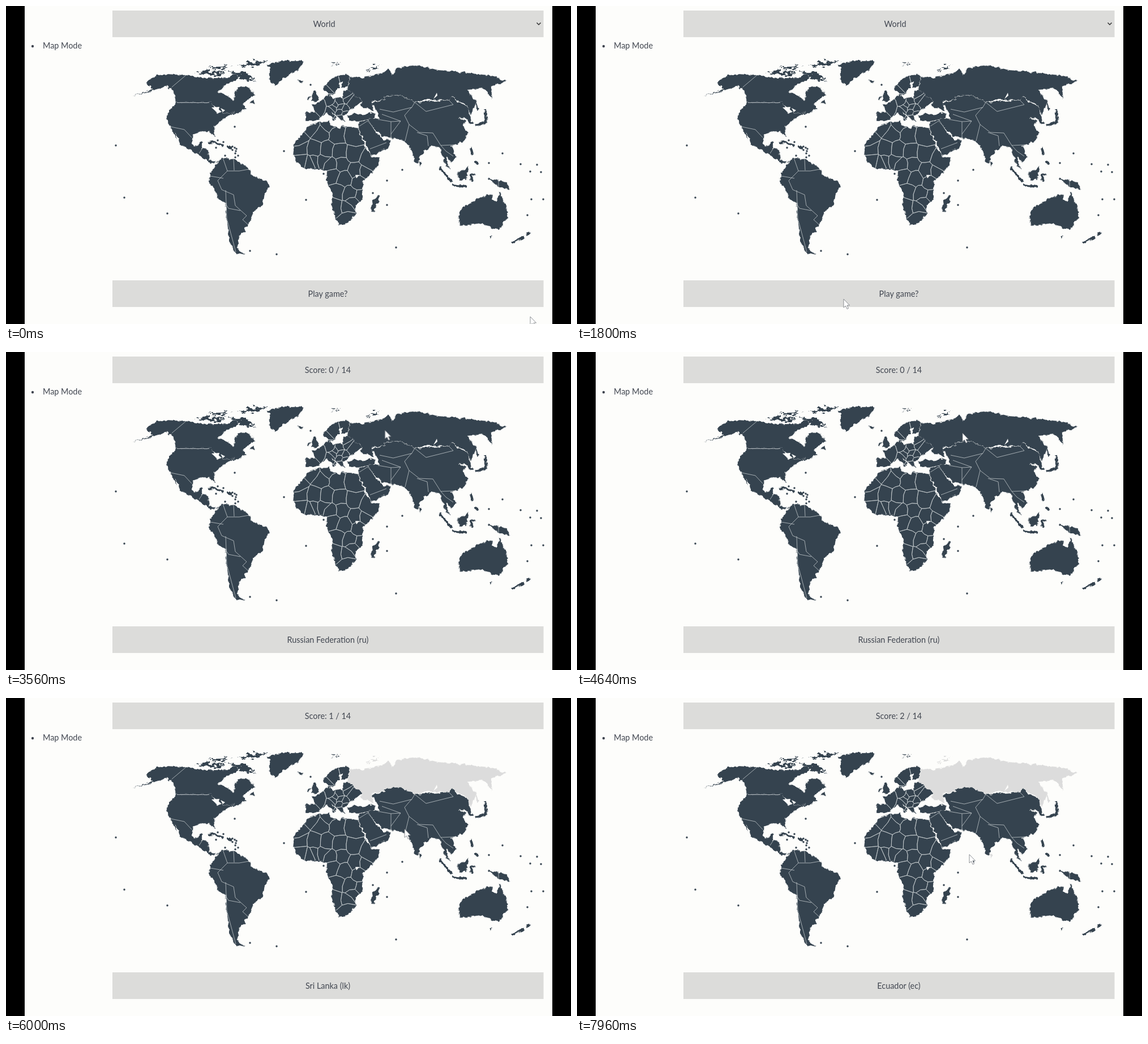
These frames come from a looping animation (998x561 px, 8 s). An HTML page:

```html
<!DOCTYPE html>
<html lang="en">
<head>
<meta charset="utf-8">
<title>Map quiz</title>
<style>
html, body { margin: 0; width: 100%; height: 100%; overflow: hidden; background: #fdfdfb; }
svg { display: block; width: 100vw; height: 100vh; }
text { font: 14.4px Lato, "Open Sans", sans-serif; fill: #414650; text-anchor: middle; }
.bar { fill: #dcdcda; }
.land { fill: #35434f; stroke: #fdfdfb; stroke-width: .3; stroke-linejoin: round; }
.isles { fill: none; stroke: #35434f; stroke-width: 4; }
.borders { fill: none; stroke: #d3d8da; stroke-width: .7; stroke-linejoin: round; }
.water { fill: #fdfdfb; }
.dots { fill: none; marker: url(#dot); }

/* One loop is 8 s, so 1% is 80 ms. */
.step { visibility: hidden; animation: 8s step-end infinite; }
.menu { animation-name: menu; }
.first { animation-name: first; }
.second { animation-name: second; }
.third { animation-name: third; }
@keyframes menu { 0% { visibility: visible } 24%, 100% { visibility: hidden } }
@keyframes first { 24% { visibility: visible } 60%, 100% { visibility: hidden } }
@keyframes second { 60% { visibility: visible } 90%, 100% { visibility: hidden } }
@keyframes third { 90%, 100% { visibility: visible } }

.russia { animation: solved-early 8s linear infinite; }
.lanka { animation: solved-late 8s linear infinite; }
@keyframes solved-early { 0%, 60% { fill: #35434f } 63%, 100% { fill: #dcdcdc } }
@keyframes solved-late { 0%, 90% { fill: #35434f } 93%, 100% { fill: #dcdcdc } }

.cursor { animation: cursor 8s ease-in-out infinite; }
@keyframes cursor {
  0%, .5% { transform: translate(926px, 548px) }
  5.5%, 7.5% { transform: translate(880px, 538px) }
  17.5%, 24% { transform: translate(471px, 517px) }
  32.5%, 35.5% { transform: translate(539px, 449px) }
  45.5%, 46% { transform: translate(672px, 132px) }
  49% { transform: translate(681px, 143px) }
  67.5% { transform: translate(681px, 143px); animation-timing-function: ease-in }
  75% { transform: translate(704px, 231px); animation-timing-function: ease-out }
  87.5% { transform: translate(729px, 278px) }
  97.5% { transform: translate(729px, 278px); animation-timing-function: ease-in }
  99.5%, 100% { transform: translate(693px, 276px) }
}
</style>
</head>
<body>
<svg viewBox="0 0 998 561" preserveAspectRatio="none">
  <defs>
    <filter id="coast" filterUnits="userSpaceOnUse" x="188" y="80" width="762" height="370" color-interpolation-filters="sRGB">
      <feTurbulence type="fractalNoise" baseFrequency=".14" numOctaves="2" seed="4"/>
      <feDisplacementMap in="SourceGraphic" scale="7" xChannelSelector="R" yChannelSelector="G"/>
    </filter>
    <filter id="ragged" filterUnits="userSpaceOnUse" x="188" y="80" width="762" height="370" color-interpolation-filters="sRGB">
      <feTurbulence type="fractalNoise" baseFrequency=".12 .2" numOctaves="3" seed="9"/>
      <feDisplacementMap in="SourceGraphic" scale="18" xChannelSelector="R" yChannelSelector="G"/>
    </filter>
    <marker id="dot" viewBox="-2 -2 4 4" markerWidth="4" markerHeight="4" markerUnits="userSpaceOnUse">
      <circle r="1.75" fill="#35434f"/>
    </marker>
    <clipPath id="old-world">
      <use href="#africa"/><use href="#europe"/><use href="#nordic"/>
    </clipPath>
  </defs>

  <rect width="998" height="561" fill="#fdfdfb"/>
  <path d="M0 0H33V561H0zM965 0H998V561H965z"/>
  <path class="bar" d="M188 8H949.5V55H188zM188 484H949.5V531H188z"/>
  <circle cx="47" cy="71" r="2.2" fill="#414650"/>
  <text x="65" y="75" style="text-anchor:start">Map Mode</text>

  <!-- Arctic islands -->
  <g class="land" filter="url(#ragged)">
    <path d="M404 107 430 99 468 96 440 105zM392 114 430 118 440 131 414 130zM335 119 352 113 388 117 378 124zM358 109 402 105 374 112zM572 101 593 100 580 104z"/>
    <path class="russia" d="M636 118 648 107 662 106 646 112z"/>
  </g>

  <g class="land" filter="url(#coast)">
    <!-- The Americas -->
    <path d="M221 159 260 146 247 136 262 123 286 120 318 122 354 127 392 127 404 118 412 128 392 137 375 150 390 157 402 167 405 153 410 142 430 143 440 157 418 172 425 182 403 191 388 192 362 172 300 172 297 152 285 141 260 149z"/>
    <path d="M300 170H362L374 189 404 187 382 201 367 213 369 232 361 222 345 221 330 226 328 243 337 248 341 241 349 239 346 251 357 253 359 271 371 275 368 279 353 272 334 258 308 245 300 223 302 236 290 212 284 200 286 189z"/>
    <path d="M459 104 486 97 526 97 517 112 489 128 475 142 464 128 468 110zM513 131 525 130 521 136zM430 171 438 165 441 172z"/>
    <path d="M371 279 382 267 404 271 429 287 434 298 461 310 465 318 457 332 453 351 438 362 427 388 420 390 423 397 413 406 408 427 424 440 404 436 394 412 387 347 376 341 358 308 361 295z"/>
    <!-- Europe and Africa -->
    <path id="nordic" d="M563 150 562 141 578 127 600 120 607 124 604 142 592 145 595 133 587 137 588 144 578 157 571 157z"/>
    <path id="europe" d="M529 186 547 187 541 174 554 169 570 155 578 164 594 161 596 151 605 147 630 168 614 181 606 180 603 190 594 194 598 206 583 193 575 187 584 197 579 203 566 188 549 203 529 203z"/>
    <path d="M541 152 546 149 553 166 539 170zM534 160 540 159 532 167zM604 194 616 190 637 191 641 186 652 191 648 198 622 204 606 202z"/>
    <path id="africa" d="M537 208 572 202 573 209 588 216 594 211 621 215 636 251 647 266 662 267 657 283 631 309 630 341 618 351 618 367 603 384 587 386 574 350 577 331 566 309 567 291 556 287 527 287 512 274 507 262 510 242 524 225z"/>
    <path d="M659 333 659 342 649 364 644 357 648 342z"/>
    <!-- Asia -->
    <path d="M624 204 641 201 654 223 668 236 680 237 674 250 646 264 622 217z"/>
    <path d="M643 171 670 165 668 159 696 157 722 170 782 166 787 159 806 173 816 177 819 195 826 209 820 209 814 200 800 197 812 203 807 209 816 224 808 239 786 247 795 266 786 275 777 265 785 290 774 274 765 249 750 246 732 264 728 278 723 276 711 245 699 236 664 230 641 207 640 197 660 199 652 178z"/>
    <path class="lanka" d="M729 273 734 278 730 283z"/>
    <g class="russia">
      <path d="M607 124 627 127 668 118 675 110 684 121 690 109 724 104 764 113 790 115 860 123 884 133 857 141 859 165 845 145 815 148 831 170 821 193 815 176 787 159 782 166 740 165 722 170 696 157 668 159 670 165 646 168 649 187 626 176 630 168 604 148z"/>
      <path d="M830 165 836 182 831 184z"/>
    </g>
    <!-- Oceania -->
    <path d="M797 294 817 283 813 307 801 307zM850 303 884 311 890 324 868 318z"/>
    <path d="M799 370 804 357 838 338 849 333 860 334 858 341 867 345 871 327 887 362 885 374 871 395 853 391 842 383 820 386 801 388zM853 405 861 404 855 411z"/>
    <path class="isles" d="M846 183 849 204 830 211M767 286 788 311M789 316 813 319M821 250 824 262M830 273 834 281M829 296 821 298 823 310M926 398 919 403M916 407 893 418M357 241 368 240 384 247M391 249 399 250"/>
  </g>

  <path class="water" d="M363 179 377 178 374 189zM379 180 387 184 383 187zM755 164 761 153 762 158zM617 298 624 298 619 304z"/>

  <g class="borders">
    <path d="M318 122 293 143M302 170.500H359M291 213 315 218 328 232M341 260 347 251"/>
    <path d="M383 268 391 291 374 308 381 324 402 333 405 352 425 370 418 377 428 386M391 291 412 291 429 288M402 270 403 290M361 300 384 304M386 346 393 357 414 361M388 325 390 375 406 434"/>
    <path d="M660 182 684 187 716 179 704 193 712 209 705 238M716 180 722 170 742 186 790 174 782 166M664 191 697 203 680 204 657 200M680 204V235M697 203 680 226M712 209 730 223 754 224 768 246 790 245M726 223 744 229 746 247M768 246 777 256 790 265M624 212 640 202 651 219M643 252 672 241M870 305V319"/>
    <path id="cells" clip-path="url(#old-world)"/>
  </g>

  <polyline class="dots" points="404,213 194,246 209,338 285,366 431,432 478,438 491,256 530,342 561,296 673,308 700,289 689,426 673,351 853,277 877,260 909,279 938,280 926,292 945,293 921,369 928,341 949,341 853,305 648,330"/>
  <polyline class="dots" points="374,237 384,240 371,250 395,249 400,248 404,250 407,252 400,254 406,256 405,260 410,264 405,267 387,264 538,139"/>

  <g class="step menu">
    <text x="562" y="37">World</text>
    <path d="M937.500 29.500 941 33 944.500 29.500" fill="none" stroke="#333" stroke-width="1.500"/>
    <text x="568.500" y="513">Play game?</text>
  </g>
  <g class="step first">
    <text x="568.500" y="37">Score: 0 / 14</text>
    <text x="568.500" y="513">Russian Federation (ru)</text>
  </g>
  <g class="step second">
    <text x="568.500" y="37">Score: 1 / 14</text>
    <text x="568.500" y="513">Sri Lanka (lk)</text>
  </g>
  <g class="step third">
    <text x="568.500" y="37">Score: 2 / 14</text>
    <text x="568.500" y="513">Ecuador (ec)</text>
  </g>

  <path class="cursor" d="M0 0V15L3.500 12 6 17.500 8.500 16.500 6 11H10.500z" fill="#fff" stroke="#70747a" stroke-width=".8"/>
</svg>
<script>
// Country borders: each place on land belongs to the nearest centre.
const africa = '540 214 518 234 522 249 545 252 555 225 570 208 586 228 614 228 567 254 589 258 615 260 562 274 543 277 521 273 533 278 574 281 592 280 640 272 635 293 618 291 625 310 597 304 578 297 586 329 607 333 627 338 612 347 602 357 585 357 602 374';
const europe = '555 179 538 195 574 169 588 169 581 174 578 179 572 186 590 179 598 183 598 190 591 187 592 197 612 172 604 163 600 157 580 140 570 145 598 133';
const centres = `${africa} ${europe}`.match(/\d+ \d+/g).map(pair => pair.split(' ').map(Number));

// Keeps the part of a polygon that is nearer to a than to b.
function clip(polygon, a, b) {
  const side = ([x, y]) =>
    (x - (a[0] + b[0]) / 2) * (b[0] - a[0]) + (y - (a[1] + b[1]) / 2) * (b[1] - a[1]);
  return polygon.flatMap((p, i) => {
    const q = polygon[(i + 1) % polygon.length];
    const sp = side(p), sq = side(q), kept = sp <= 0 ? [p] : [];
    if (sp * sq < 0) {
      const t = sp / (sp - sq);
      kept.push([p[0] + (q[0] - p[0]) * t, p[1] + (q[1] - p[1]) * t]);
    }
    return kept;
  });
}

// Bends an edge at its middle, the same way from both sides.
function bend(p, q) {
  const x = (p[0] + q[0]) / 2, y = (p[1] + q[1]) / 2;
  const size = Math.hypot(p[0] - q[0], p[1] - q[1]) * 0.12;
  return [x + size * Math.sin(x + y), y + size * Math.cos(x - y)];
}

const frame = [[490, 100], [690, 100], [690, 400], [490, 400]];
const outline = centre => {
  const cell = centres.reduce((poly, other) => other === centre ? poly : clip(poly, centre, other), frame);
  const bent = cell.flatMap((p, i) => [p, bend(p, cell[(i + 1) % cell.length])]);
  return `M${bent.map(p => p.map(v => v.toFixed(1))).join(' ')}z`;
};
document.getElementById('cells').setAttribute('d', centres.map(outline).join(''));
</script>
</body>
</html>
```
